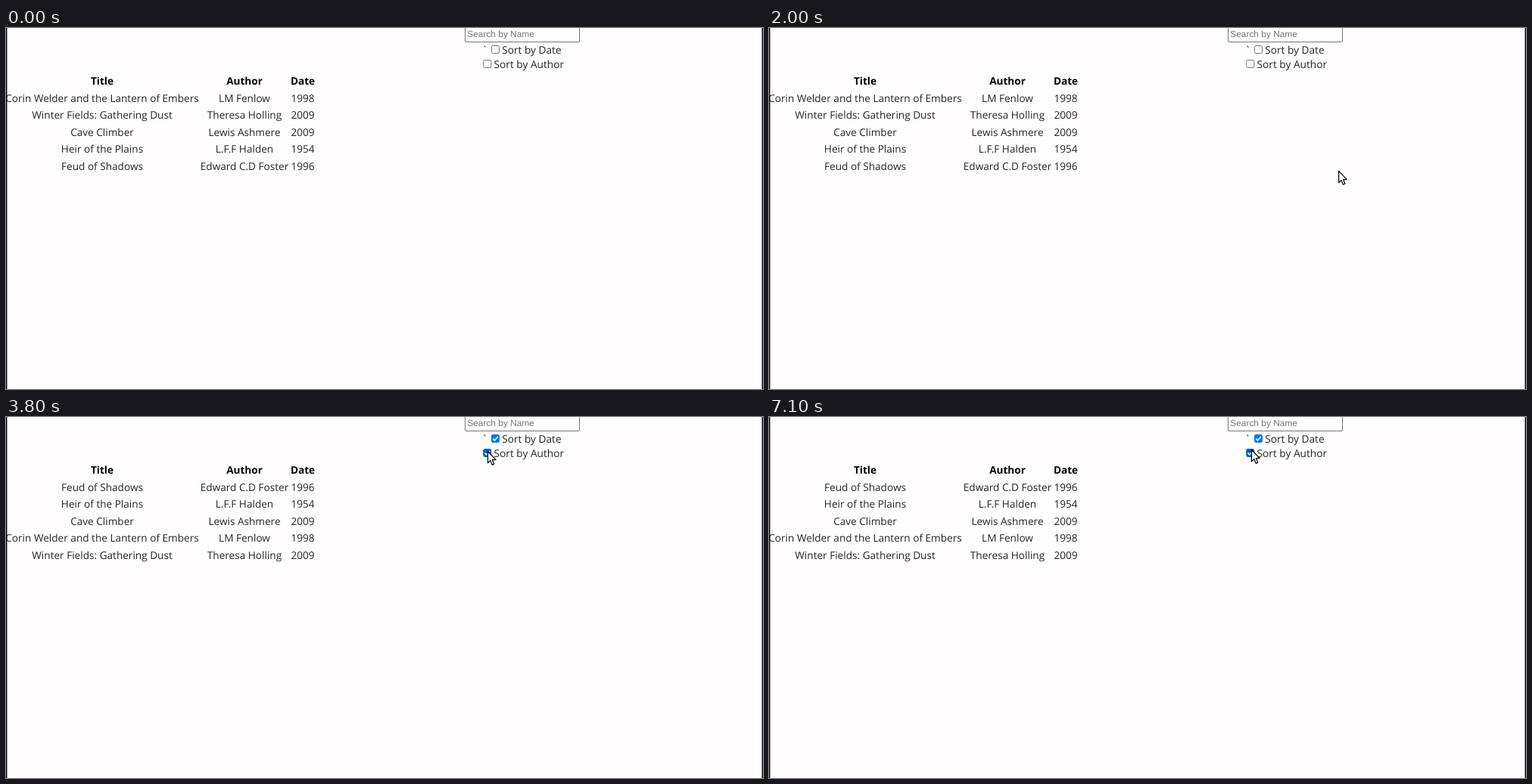
An HTML page for the animation above (7.2 s loop, 1000x478 px).

```html
<!DOCTYPE html>
<html lang="en">
<head>
<meta charset="utf-8">
<title>Book list</title>
<style>
  html, body { margin: 0; width: 100%; height: 100%; overflow: hidden; background: #fffdfe; }
  svg { display: block; width: 1000px; height: 478px; }
  text { font: 13.6px "Open Sans", "Noto Sans", sans-serif; fill: #212529; text-rendering: geometricPrecision; }
  .mid { text-anchor: middle; }
  .head { font-weight: 700; fill: #000; }
  .side { font-size: 13.7px; }
  .hint { font: 11.9px "Liberation Sans", Arial, sans-serif; fill: #757575; }
</style>
</head>
<body>
<svg id="stage" viewBox="0 0 1000 478"></svg>
<script>
const LOOP = 7200, STEP = 100;
const ENTER = 1900, DATE_PRESS = 2700, DATE_CLICK = 2800, AUTHOR_CLICK = 3700;
const COLS = [127, 315, 392];
const BOOKS = [
  ["Corin Welder and the Lantern of Embers", "LM Fenlow", 1998],
  ["Winter Fields: Gathering Dust", "Theresa Holling", 2009],
  ["Cave Climber", "Lewis Ashmere", 2009],
  ["Heir of the Plains", "L.F.F Halden", 1954],
  ["Feud of Shadows", "Edward C.D Foster", 1996]
];
const byDate = [...BOOKS].sort((a, b) => a[2] - b[2]);
const byAuthor = [...BOOKS].sort((a, b) => a[1].localeCompare(b[1], "en"));

// Pointer path: time, x, y
const PATH = [
  [1900, 789, 247], [2600, 650, 28], [2900, 650, 28], [3300, 637, 43],
  [3400, 637, 43], [3500, 636, 45], [4100, 636, 45], [4200, 637, 43]
];

const stage = document.getElementById("stage");

function add(tag, attrs) {
  const el = document.createElementNS("http://www.w3.org/2000/svg", tag);
  for (const k in attrs) el.setAttribute(k, attrs[k]);
  return stage.appendChild(el);
}

function label(str, x, y, cls) {
  const el = add("text", { x, y, class: cls });
  el.textContent = str;
  return el;
}

function checkbox(x, y) {
  const box = add("rect", { x: x + 0.5, y: y + 0.5, width: 10, height: 10, rx: 1.8 });
  const tick = add("path", {
    d: `M${x + 2.2} ${y + 5.7}l2.3 2.3l4.4 -5`,
    fill: "none", stroke: "#fff", "stroke-width": 1.7
  });
  return (on, pressed, px, py) => {
    const hover = px >= x && px <= x + 11 && py >= y && py <= y + 11;
    const blue = hover ? "#005cc8" : "#0075ff";
    const grey = pressed ? "#9a9a9a" : hover ? "#4f4f4f" : "#767676";
    box.setAttribute("fill", on ? blue : "#fff");
    box.setAttribute("stroke", on ? blue : grey);
    tick.setAttribute("visibility", on ? "visible" : "hidden");
  };
}

add("rect", { x: 606.5, y: -4, width: 151, height: 22.5, rx: 1.5, fill: "#fff", stroke: "#767676" });
label("Search by Name", 609.3, 12.1, "hint");
label("`", 628.5, 34.4, "side");
label("Sort by Date", 655.2, 34.4, "side");
label("Sort by Author", 644.6, 53.4, "side");
const dateBox = checkbox(641, 23);
const authorBox = checkbox(630.3, 42);

["Title", "Author", "Date"].forEach((s, i) => label(s, COLS[i], 75, "mid head"));
const cells = BOOKS.map((_, r) => COLS.map(x => label("", x, 97.7 + r * 22.45, "mid")));

add("rect", { x: 0, y: 0, width: 1.5, height: 478, fill: "#16161a" });
add("rect", { x: 998.5, y: 0, width: 1.5, height: 478, fill: "#16161a" });

const pointer = add("path", {
  d: "M0.5 0.5V15.9L3.9 12.7L6.3 18.4L8.8 17.3L6.4 11.7H11.2Z",
  fill: "#fff", stroke: "#000", "stroke-width": 1.2, "stroke-linejoin": "round"
});

function pointerAt(t) {
  const i = PATH.findIndex(p => p[0] > t);
  if (i < 0) return PATH[PATH.length - 1].slice(1);
  if (i === 0) return [-99, -99];
  const [t0, x0, y0] = PATH[i - 1], [t1, x1, y1] = PATH[i];
  const k = 1 - (1 - (t - t0) / (t1 - t0)) ** 2;
  return [x0 + (x1 - x0) * k, y0 + (y1 - y0) * k];
}

let shown = null;
function fill(list) {
  if (list === shown) return;
  shown = list;
  list.forEach((book, r) => book.forEach((v, c) => { cells[r][c].textContent = v; }));
}

function draw(now) {
  const t = Math.floor((now % LOOP) / STEP) * STEP;
  const [x, y] = pointerAt(t);
  pointer.setAttribute("transform", `translate(${x} ${y})`);
  pointer.setAttribute("visibility", t >= ENTER ? "visible" : "hidden");
  dateBox(t >= DATE_CLICK, t >= DATE_PRESS, x, y);
  authorBox(t >= AUTHOR_CLICK, false, x, y);
  fill(t >= AUTHOR_CLICK ? byAuthor : t >= DATE_CLICK ? byDate : BOOKS);
}

const start = performance.now();
function tick() {
  draw(performance.now() - start);
  requestAnimationFrame(tick);
}
tick();
</script>
</body>
</html>
```
